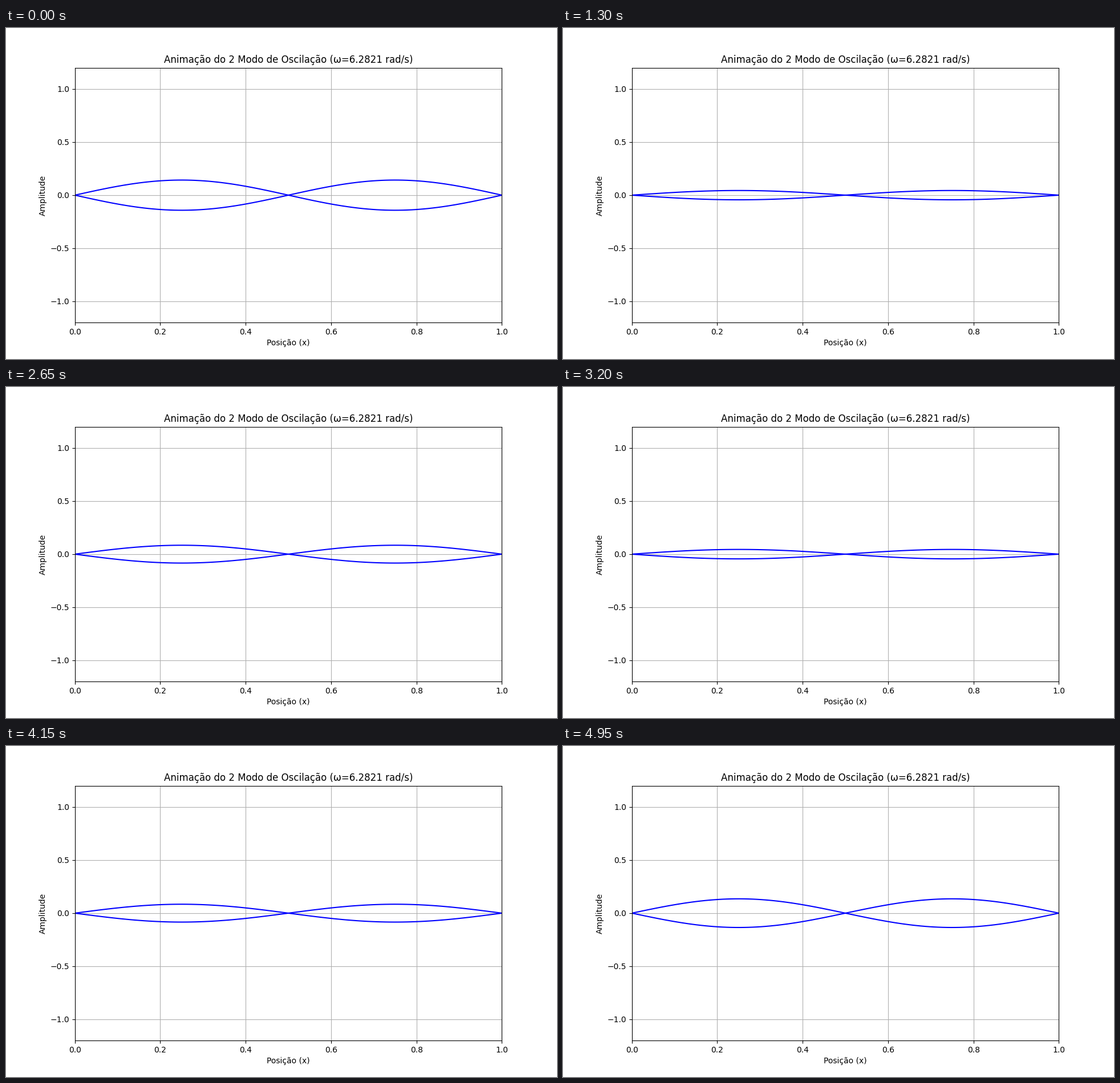
Write a matplotlib script that moves like this. It is 966 px wide and 580 px high and loops after 5000 ms.

```python
import numpy as np
import matplotlib.pyplot as plt
from matplotlib.animation import FuncAnimation

DPI = 100
FRAMES = 100
INTERVAL = 50  # ms

MODE = 2
POINTS = 100

# Second mode of a string discretised with fixed ends, unit norm
step = 1 / (POINTS - 1)
omega = 2 / step * np.sin(MODE * np.pi * step / 2)
x = np.linspace(0, 1, POINTS)
shape = np.sqrt(2 * step) * np.sin(MODE * np.pi * x)

plt.rcParams["font.family"] = "DejaVu Sans"
fig, ax = plt.subplots(figsize=(9.66, 5.8), dpi=DPI)
ax.set_xlim(0, 1)
ax.set_ylim(-1.2, 1.2)
ax.set_xlabel("Posição (x)")
ax.set_ylabel("Amplitude")
ax.set_title(f"Animação do {MODE} Modo de Oscilação (ω={omega:.4f} rad/s)")
ax.grid(True)

upper, = ax.plot(x, shape, "b-")
lower, = ax.plot(x, -shape, "b-")


def update(frame):
    t = frame * INTERVAL / 1000
    y = shape * np.cos(omega * t)
    upper.set_ydata(y)
    lower.set_ydata(-y)
    return upper, lower


anim = FuncAnimation(fig, update, frames=FRAMES, interval=INTERVAL,
                     repeat=True, repeat_delay=0, blit=False)
plt.show()
```
